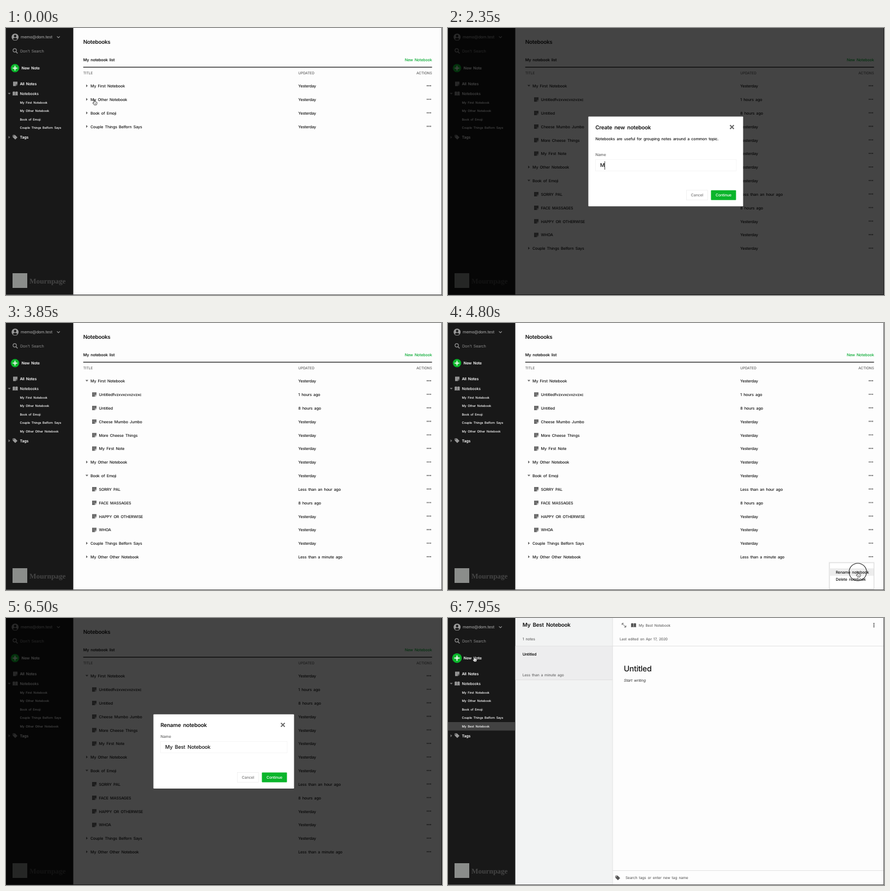
An HTML page for the animation above (8000 ms loop, 800 by 490 pixels).

```html
<!DOCTYPE html>
<html lang="en">
<head>
<meta charset="utf-8">
<title>Notebooks</title>
<style>
  html, body { margin: 0; width: 100%; height: 100%; overflow: hidden; background: #fdfdfd; }
  svg { display: block; width: 800px; height: 490px; }
  text {
    font-family: Inter, "Liberation Sans", sans-serif;
    letter-spacing: -.022em;
    word-spacing: .2em;
    text-rendering: geometricPrecision;
    white-space: pre;
  }
  .brand { font-family: "Liberation Serif", serif; letter-spacing: 0; }
</style>
</head>
<body>
<svg viewBox="0 0 800 490">
  <g id="side"></g>
  <g id="page"></g>
  <g id="edge" fill="#555"><path d="M799 0h1v490h-1zM0 489h800v1h-800z"/></g>
  <g id="modal"></g>
  <g id="cursor"></g>
</svg>
<script>
const LOOP = 8000;
const GREEN = '#0ab52b';

// Moments at which the state of the app changes
const AT = {
  openFirst: 450, openEmoji: 950,
  create: 1850, created: 3750,
  menu: 4600, rename: 4900, renamed: 6650,
  notebook: 7300, hoverNew: 7640, note: 7850
};

const rect = (x, y, w, h, fill, more = '') =>
  `<rect x="${x}" y="${y}" width="${w}" height="${h}" fill="${fill}" ${more}/>`;
const path = (d, fill, more = '') => `<path d="${d}" fill="${fill}" ${more}/>`;
const circle = (x, y, r, fill, more = '') => `<circle cx="${x}" cy="${y}" r="${r}" fill="${fill}" ${more}/>`;
const at = (x, y, body, scale = 1) => `<g transform="translate(${x} ${y}) scale(${scale})">${body}</g>`;

// Text with its capitals centred on y
const text = (s, x, y, size = 7.15, fill = '#111', weight = 500, more = '') =>
  `<text x="${x}" y="${y + size * .36}" font-size="${size}" fill="${fill}" font-weight="${weight}" ${more}>${s}</text>`;

const icon = {
  note: (x, y, c, back) => at(x - 4, y - 4,
    path('M0 0H8V5H5V8H0ZM5.7 5.7H8L5.7 8Z', c) +
    path('M1.3 2H6.7M1.3 3.6H6.7M1.3 5.2H4', 'none', `stroke="${back}" stroke-width=".4" opacity=".3"`)),
  book: (x, y, c) => at(x - 4.6, y - 4.4,
    path('M0 1Q2.5 0 4.3 1V8Q2.5 7 0 8ZM4.9 1Q7 0 9.2 1V8Q7 7 4.9 8Z', c)),
  tag: (x, y, c, back) => at(x - 4.3, y - 4.3,
    path('M0 .6Q0 0 .6 0H4L8.6 4.6 4.6 8.6 0 4Z', c) + circle(1.8, 1.8, .8, back)),
  fold: (x, y, open, c) => at(x, y,
    path(open ? 'M-2.6 -1.5H2.6L0 1.5Z' : 'M-1.4 -2.6V2.6L1.6 0Z', c)),
  dots: (x, y, c, dx, dy) =>
    [-1, 0, 1].map(i => circle(x + i * dx, y + i * dy, 1.15, c)).join('')
};

const track = (t, keys, ease = k => k) => {
  if (t <= keys[0][0]) return keys[0].slice(1);
  const i = keys.findIndex(k => k[0] > t);
  if (i < 0) return keys[keys.length - 1].slice(1);
  const a = keys[i - 1], b = keys[i], k = ease((t - a[0]) / (b[0] - a[0]));
  return a.slice(1).map((v, n) => v + (b[n + 1] - v) * k);
};
const smooth = k => k * k * (3 - 2 * k);
const within = (t, spans) => spans.some(([a, b]) => t >= a && t < b);

const newName = t => t < AT.renamed ? 'My Other Other Notebook' : 'My Best Notebook';
const books = t => ['My First Notebook', 'My Other Notebook', 'Book of Emoji', 'Couple Things Belforn Says']
  .concat(t >= AT.created ? newName(t) : []);

function side(t) {
  const grey = '#999', dark = '#181818', white = '#fff';
  const names = books(t), tagsY = 138.3 + names.length * 15.55;
  const hover = t >= AT.hoverNew ? 1.15 : 1;
  return rect(0, 0, 123.7, 490, dark) +
    circle(16.7, 16.6, 6.4, grey) + circle(16.7, 14.7, 2.2, dark) +
    path('M12.4 20.3Q16.7 15.6 21 20.3Q16.7 24 12.4 20.3Z', dark) +
    text('memo@dom.test', 27, 16.8, 7.4, grey, 500) +
    path('M93.6 15.4l2.6 2.6 2.6-2.6', 'none', `stroke="${grey}" stroke-width="1.2"`) +
    circle(16, 41, 3.1, 'none', `stroke="${grey}" stroke-width="1.2"`) +
    path('M18.3 43.4l3 3', 'none', `stroke="${grey}" stroke-width="1.4"`) +
    text("Don't Search", 26, 42, 7.2, '#8a8a8a', 400) +
    at(16.5, 73.6, circle(0, 0, 7.7, GREEN) +
      path('M-4.3 0H4.3M0 -4.3V4.3', 'none', 'stroke="#fff" stroke-width="1.7"'), hover) +
    text('New Note', 28.5, 73.6, 7, white, 600) +
    icon.note(17, 102.4, grey, dark) + text('All Notes', 25.4, 102.2, 7.05, white, 600) +
    icon.fold(6, 120.4, true, '#777') + icon.book(16.9, 120.4, grey) +
    text('Notebooks', 25.4, 120.3, 6.9, white, 500) +
    (t >= AT.notebook ? rect(0, 191, 123.7, 15.6, '#424242') : '') +
    names.map((s, i) => text(s, 25.4, 136.6 + i * 15.55, 5.72, white)).join('') +
    icon.fold(6, tagsY, false, '#777') + icon.tag(16.7, tagsY, grey, dark) +
    text('Tags', 25.4, tagsY, 7.1, white, 600) +
    rect(12, 450, 27, 27, '#8b8d8b') +
    text('Mournpage', 43, 464, 13.3, '#454545', 700, 'class="brand"');
}

const firstNotes = [['Untitledfvzxvxcvxzvzxc', '1 hours ago'], ['Untitled', '8 hours ago'],
  ['Cheese Mumbo Jumbo'], ['More Cheese Things'], ['My First Note']];
const emojiNotes = [['SORRY PAL', 'Less than an hour ago'], ['FACE MASSAGES', '8 hours ago'],
  ['HAPPY OR OTHERWISE'], ['WHOA']];

function list(t) {
  const opened = { 0: [AT.openFirst, firstNotes], 2: [AT.openEmoji, emojiNotes] };
  const rows = books(t).flatMap((name, i) => {
    const [when, notes] = opened[i] || [Infinity];
    const open = t >= when;
    return [{ name, open, date: i === 4 ? 'Less than a minute ago' : 'Yesterday' }]
      .concat(open ? notes.map(([name, date = 'Yesterday']) => ({ name, date, note: true })) : []);
  });
  const head = (s, x, more) => text(s, x, 82.7, 6.55, '#666', 500, more);
  const end = 'text-anchor="end"';
  const body = rows.map(({ name, date, note, open }, i) => {
    const y = 106.6 + i * 24.84;
    return (note ? icon.note(162, y - .2, '#666', '#fdfdfd') : icon.fold(148.4, y - .5, open, '#666')) +
      text(name, note ? 170.6 : 155, y) + text(date, 536.2, y) + icon.dots(776, y - .6, '#666', 3, 0);
  }).join('');
  return rect(123.7, 0, 676.3, 490, '#fdfdfd') +
    text('Notebooks', 141.7, 25.8, 9.85, '#111', 600) +
    text('My notebook list', 141.7, 58.3, 7.15, '#111', 600) +
    text('New Notebook', 781.5, 58.3, 7.1, '#00a82d', 500, end) +
    rect(141.7, 71.2, 640, 1.4, '#222') +
    head('TITLE', 141.7) + head('UPDATED', 536.2) + head('ACTIONS', 781.5, end) + body +
    (t >= AT.menu && t < AT.rename ? menu(t) : '');
}

function menu(t) {
  return rect(698.5, 438.5, 84, 51, '#000', 'opacity=".05"') +
    rect(700, 440, 81.5, 48, '#fff', 'stroke="#ccc" stroke-width=".7"') +
    (t >= 4680 ? rect(700.5, 450.3, 80.5, 13.5, '#ececec') : '') +
    text('Rename notebook', 711.5, 457) + text('Delete notebook', 711.5, 470.5);
}

function notebook(t) {
  const made = t >= AT.note, line = '#dcdcdc', grey = '#666';
  return rect(123.7, 0, 178.3, 490, '#f2f3f3') + rect(302, 0, 498, 490, '#fdfdfd') +
    text('My Best Notebook', 136.7, 12.5, 9.85, '#111', 600) +
    text(made ? '1 notes' : '0 notes', 136.7, 38.3, 6.8, grey) +
    rect(123.7, 51, 178.3, .8, line) +
    (made ? rect(123.7, 51.8, 178.3, 61.5, '#ededee') + rect(123.7, 113.2, 178.3, .8, line) +
      text('Untitled', 136.7, 66, 7.05, '#111', 600) +
      text('Less than a minute ago', 136.7, 104.3, 6.7, grey) +
      path('M320.2 10.6L325.6 16M319.4 12.8V9.8H322.4M326.4 13.8V16.8H323.4', 'none', 'stroke="#555"') +
      icon.book(340.5, 13.4, '#555') + text('My Best Notebook', 350, 13.8, 6.55, grey) +
      icon.dots(781.5, 13.2, '#555', 0, 3) +
      text('Last edited on Apr 17, 2020', 315, 38.3, 6.6, grey) +
      rect(302, 51, 498, .8, line) +
      text('Untitled', 322.6, 92.5, 14.3, '#111', 500) +
      text('Start writing', 322.8, 114.2, 7, '#333', 400, 'font-style="italic"') +
      rect(302, 463, 498, .8, line) + icon.tag(311.5, 477, '#555', '#fdfdfd') +
      text('Search tags or enter new tag name', 325.7, 476.6, 6.7, grey) : '') +
    rect(301.6, 0, .8, 490, line);
}

function dialog({ x, y, w, h, title, hint, labelY, value, ready, fade }) {
  const r = x + w, foot = y + h - 20.5;
  return `<g opacity="${fade}">` + rect(0, 0, 800, 490, '#000', 'opacity=".73"') +
    rect(x, y, w, h, '#fff', 'rx="1"') +
    text(title, x + 13, y + 19.5, 9.9, '#111', 600) +
    path(`M${r - 24} ${y + 15.8}l7 7m0 -7l-7 7`, 'none', 'stroke="#666" stroke-width="2"') +
    (hint ? text(hint, x + 13, y + 40.5, 7.17) : '') +
    text('Name', x + 13, labelY, 7.1, '#666', 500) +
    rect(x + 13, labelY + 9.2, w - 25.5, 20.5, '#fff', 'stroke="#f0f0f0" stroke-width=".7"') +
    rect(0, labelY + 12, 0, 15, '#a8cdf8', 'id="sel"') +
    text(value, x + 21.5, labelY + 19.5, 9.4, '#111', 500, 'id="field"') +
    rect(0, labelY + 12, .8, 15.5, '#111', 'id="caret" visibility="hidden"') +
    rect(r - 104, foot - 9, 39, 18, '#fff', 'stroke="#ebebeb" stroke-width=".7"') +
    text('Cancel', r - 84.5, foot, 7, '#777', 500, 'text-anchor="middle"') +
    rect(r - 59, foot - 9, 46, 18, ready ? GREEN : '#ececec', 'rx="1"') +
    text('Continue', r - 36, foot, 7, '#fff', 500, 'text-anchor="middle"') + '</g>';
}

const typed = (s, n) => s.slice(0, Math.floor(n + .01));
const fadeIn = (t, from) => Math.min(1, (t - from) / 250).toFixed(3);

function modal(t) {
  if (t >= AT.create && t < AT.created) {
    const [n] = track(t, [[2230, 0], [3100, 13], [3550, 23]]);
    const value = typed('My Other Other Notebook', n);
    return dialog({ x: 257.5, y: 162.5, w: 284, h: 164.7, labelY: 232.5, title: 'Create new notebook',
      hint: 'Notebooks are useful for grouping notes around a common topic.',
      value, ready: value, fade: fadeIn(t, AT.create) });
  }
  if (t >= AT.rename && t < AT.renamed) {
    const [n] = track(t, [[6150, 0], [6350, 4]]);
    const editing = t >= 6200;
    const value = editing ? `My ${typed('Best', n)} Notebook` : 'My Other Other Notebook';
    return dialog({ x: 270.5, y: 176.8, w: 258, h: 136.2, labelY: 217.5, title: 'Rename notebook',
      value, ready: editing, fade: fadeIn(t, AT.rename) });
  }
  return '';
}

// Caret and selection follow the measured text
function mark(t) {
  const field = document.getElementById('field');
  if (!field) return;
  const left = +field.getAttribute('x');
  const edge = n => left + (n ? field.getSubStringLength(0, n) : 0);
  const caret = document.getElementById('caret'), sel = document.getElementById('sel');
  const len = field.textContent.length;
  const creating = t < AT.created;
  const shown = creating || within(t, [[6200, 6500]]);
  caret.setAttribute('visibility', shown ? 'visible' : 'hidden');
  caret.setAttribute('x', edge(creating ? len : len - 9));
  if (t >= 5680 && t < 6200) {
    const a = edge(Math.round(track(t, [[5680, 14], [5750, 9], [5850, 3]])[0]));
    sel.setAttribute('x', a);
    sel.setAttribute('width', edge(14) - a);
  }
}

const moves = [[50, 162, 132], [350, 148, 106], [500, 148, 106], [850, 148, 279], [1350, 148, 279],
  [1700, 744, 60], [3900, 744, 60], [4450, 776, 429], [4620, 776, 429], [4750, 752, 457],
  [5400, 752, 457], [5640, 362, 238], [5680, 362, 238], [5750, 333, 240], [5850, 309, 241],
  [6050, 307, 243], [6700, 307, 243], [7150, 50, 196], [7450, 50, 196], [7700, 48, 71]];
const presses = [[400, 500], [900, 1000], [1700, 1850], [4550, 4650], [4750, 4880], [5650, 5900],
  [7200, 7300], [7750, 7850]];
const hidden = [[2150, 3900], [6200, 6700]];
const arrows = [[1850, 2150], [3900, 4400], [4900, 6200], [6700, 7080]];

const hand = path('M-.9 .3Q0 -.7 .9 .3V3.2Q1.8 2.7 2.3 3.6Q3.2 3.1 3.7 4Q5 3.7 5 5.2Q5 7.6 3.9 9.2H-.3' +
  'Q-1.2 7.6 -2.7 5.9Q-2.9 4.6 -1.6 5.1L-.9 5.8Z', '#fff',
  'stroke="#111" stroke-width=".8" stroke-linejoin="round"') +
  path('M1.2 5.6V7.8M2.5 5.6V7.8', 'none', 'stroke="#111" stroke-width=".5"');
const arrow = path('M0 0V8L1.9 6.3 3.1 9 4.3 8.5 3.1 5.8H5.6Z', '#111', 'stroke="#fff" stroke-width=".6"');

function cursor(t) {
  if (within(t, hidden)) return '';
  const [x, y] = track(t, moves, smooth);
  const press = presses.find(p => within(t, [p]));
  let ring = '';
  if (press) {
    const [r] = track(t - press[0], [[60, 16], [100, 11.5]]);
    ring = circle(0, 0, r, 'none', 'stroke="#222" stroke-width="1.1"');
  }
  return at(x.toFixed(2), y.toFixed(2), ring + (within(t, arrows) ? arrow : hand));
}

const drawn = {};
function show(id, body) {
  if (drawn[id] === body) return;
  drawn[id] = body;
  document.getElementById(id).innerHTML = body;
}

function frame() {
  const t = performance.now() % LOOP;
  show('side', side(t));
  show('page', t < AT.notebook ? list(t) : notebook(t));
  show('modal', modal(t));
  mark(t);
  show('cursor', cursor(t));
  requestAnimationFrame(frame);
}
frame();
</script>
</body>
</html>
```
